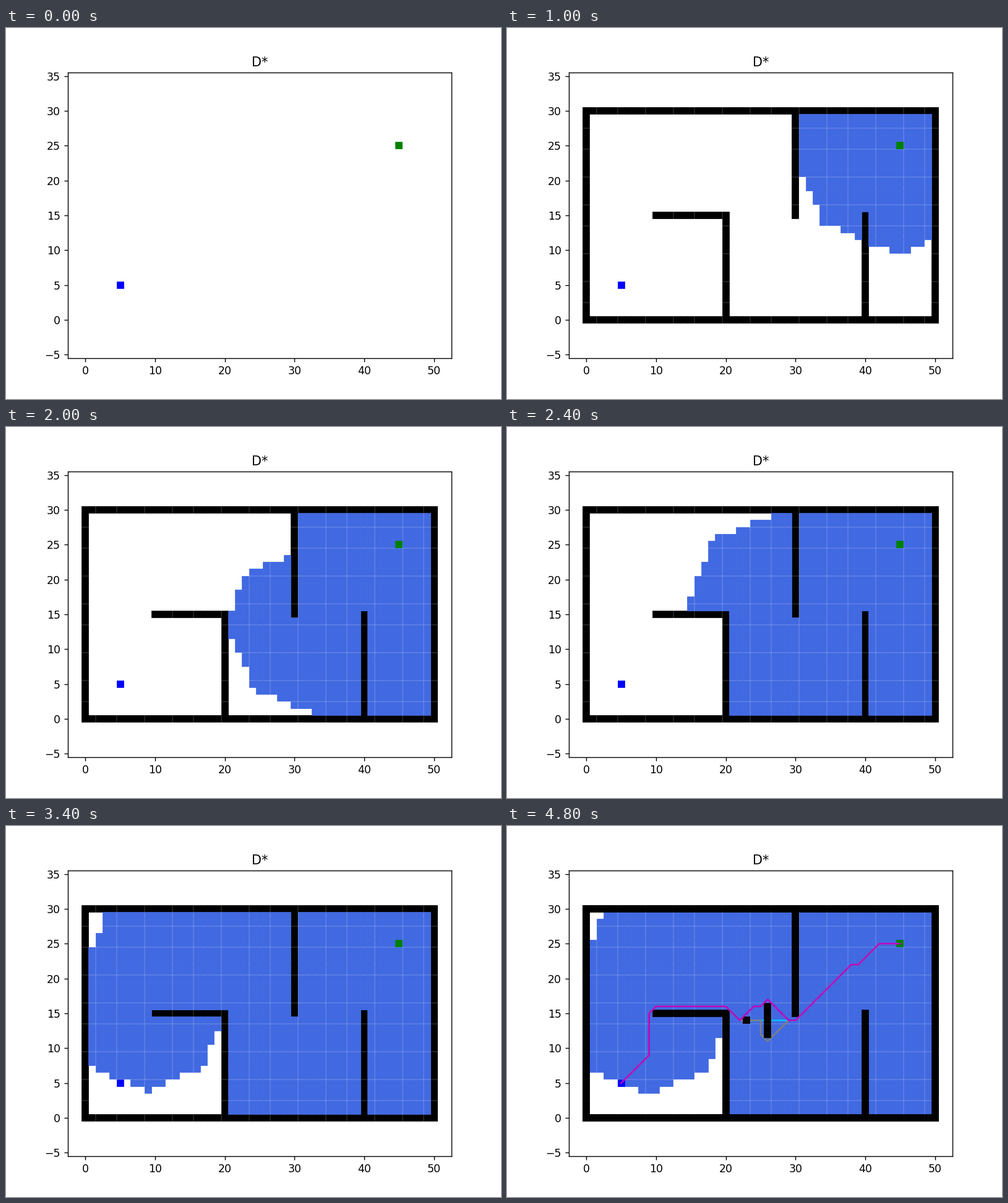
Write a matplotlib script that moves like this. It is 800 px wide and 600 px high and loops after 4.9 s.

```python
import math
from itertools import product

import numpy as np
import matplotlib.pyplot as plt
from matplotlib.animation import FuncAnimation

FRAMES, INTERVAL = 49, 100
START, GOAL = (5, 5), (45, 25)
STEPS = [s for s in product((-1, 0, 1), repeat=2) if s != (0, 0)]

# When each stage of the search becomes visible, in frames
WALLS_AT, FOUND_AT, REDRAW_AT = 1, 35, 37
DETOUR_AT, FINAL_AT = 44, 47
BLOCKS = [(26, 16, 39), (26, 15, 40), (26, 13, 41),
          (26, 14, 42), (26, 12, 43), (23, 14, 46)]

# Corner points of the three routes
HEAD = [START, (9, 9), (9, 15), (10, 16), (20, 16), (22, 14)]
TAIL = [(30, 14), (38, 22), (39, 22), (42, 25), GOAL]
ROUTE = HEAD + TAIL
DETOUR = HEAD + [(25, 14), (25, 12), (26, 11), (29, 14)] + TAIL
FINAL = HEAD + [(24, 16), (25, 16), (26, 17), (29, 14)] + TAIL


def build_walls():
    cells = [(x, y) for x in range(51) for y in (0, 30)]
    cells += [(x, y) for x in (0, 50) for y in range(1, 30)]
    cells += [(x, 15) for x in range(10, 20)]
    cells += [(20, y) for y in range(1, 16)]
    cells += [(30, y) for y in range(15, 30)]
    cells += [(40, y) for y in range(1, 16)]
    return cells


def expand(walls):
    """Cells in the order the search leaves the goal and reaches the start."""
    blocked, closed, order = set(walls), set(), []
    cost = {GOAL: 0.0}
    frontier = {GOAL}
    while frontier:
        cell = min(frontier, key=lambda c: (round(cost[c], 6), c))
        frontier.remove(cell)
        closed.add(cell)
        order.append(cell)
        if cell == START:
            break
        for dx, dy in STEPS:
            near = cell[0] + dx, cell[1] + dy
            if near in blocked or near in closed:
                continue
            c = cost[cell] + math.hypot(dx, dy)
            if c < cost.get(near, math.inf):
                cost[near] = c
                frontier.add(near)
    return order


def visited_count(i):
    if i >= FOUND_AT:
        return len(order)
    return round(np.interp(i, [0, 6, 14, 20, 28, 34.4],
                           [0, 185, 455, 687, 1007, len(order)]))


walls = build_walls()
order = expand(walls)

fig = plt.figure(figsize=(6.4, 4.8), dpi=125)
ax = fig.add_subplot()
ax.set_title("D*")
ax.set_xlim(-2.5, 52.5)
half = 55 * 462 / 620 / 2
ax.set_ylim(15 - half, 15 + half)


def squares(cells, color, z):
    xs, ys = zip(*cells) if cells else ((), ())
    return ax.plot(xs, ys, "s", color=color, zorder=z)[0]


def route(points, color, z):
    return ax.plot(*zip(*points), color=color, zorder=z)[0]


visited = squares([], "royalblue", 3)
squares([START], "b", 8)
squares([GOAL], "g", 8)

timed = [(squares(walls, "k", 2), WALLS_AT),
         (route(ROUTE, "deepskyblue", 4), FOUND_AT),
         (squares(walls, "k", 5), REDRAW_AT),
         (route(DETOUR, "gray", 6), DETOUR_AT),
         (route(FINAL, "m", 9), FINAL_AT)]
timed += [(squares([(x, y)], "k", 7), at) for x, y, at in BLOCKS]


def draw(i):
    cells = order[:visited_count(i)]
    visited.set_data([c[0] for c in cells], [c[1] for c in cells])
    for artist, at in timed:
        artist.set_visible(i >= at)
    return [visited] + [artist for artist, _ in timed]


anim = FuncAnimation(fig, draw, frames=FRAMES, interval=INTERVAL,
                     repeat=True, repeat_delay=0, blit=False)
plt.show()
```
